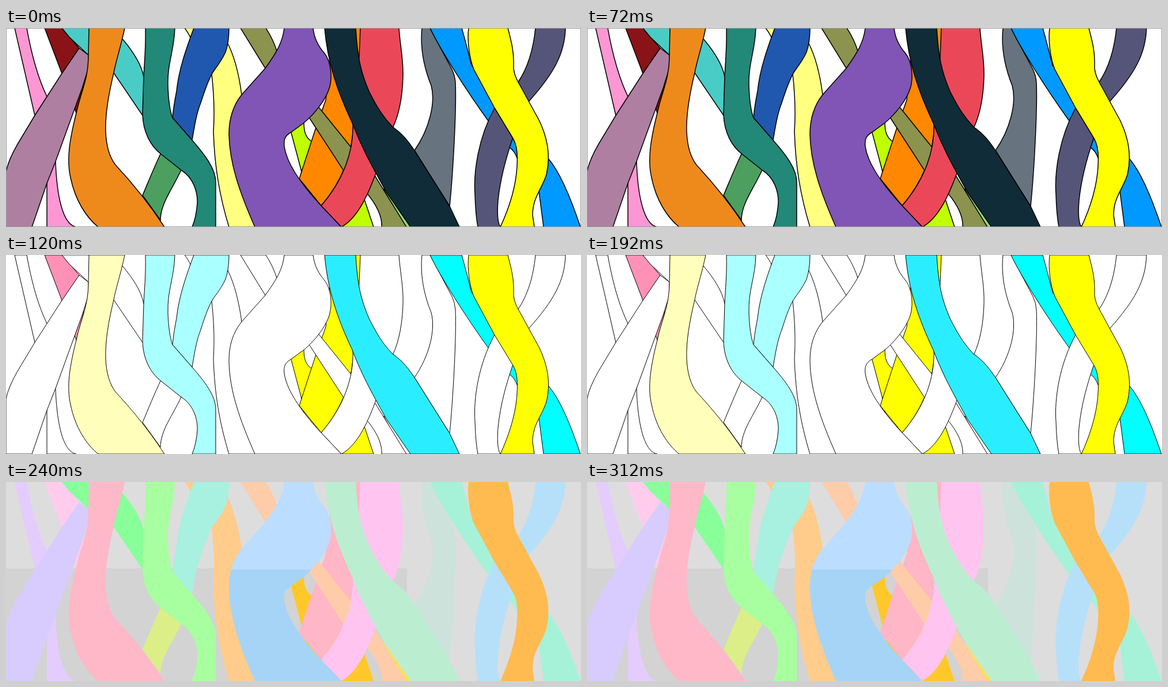
These frames come from a looping animation (998x346 px, 360 ms). An HTML page with a canvas:

```html
<!DOCTYPE html>
<html lang="en">
<head>
<meta charset="utf-8">
<title>Ribbons</title>
<style>
html, body { margin: 0; width: 100%; height: 100%; overflow: hidden; background: #fff; }
canvas { display: block; }
</style>
</head>
<body>
<canvas id="stage" width="998" height="346"></canvas>
<script>
const ctx = document.getElementById('stage').getContext('2d');
const STEP = 120;

// The wide pale ribbon turns bluer below the shaded line.
const paleBlue = ctx.createLinearGradient(0, 0, 0, 346);
paleBlue.addColorStop(0, '#bbddff');
paleBlue.addColorStop(152 / 346, '#bbddff');
paleBlue.addColorStop(152 / 346, '#a6d4f6');
paleBlue.addColorStop(1, '#a6d4f6');

// Back to front: outline, then one fill per colour scheme.
const ribbons = [
  ['M15 0L50 152C62 200 71 230 71 270V346H122C98 342 88 290 86 232L71 119C56 88 45 50 36 0Z',
    '#fc97d4', '#fff', '#e4ccff'],
  ['M67 0L97 79L122 148L135 100L127 35L97 0Z',
    '#8a1318', '#ff91b6', '#ffccee'],
  ['M97 0L110 16L143 47L187 78L237 152H245V90L239 85C235 62 218 38 203 20L143 0Z',
    '#4accc6', '#fff', '#88ff99'],
  ['M127 35L97 79L50 152L20 202Q4 230 0 250V346H45L71 270L86 232L103 185L132 105L143 70V47Z',
    '#ae7fa1', '#fff', '#d8ccff'],
  ['M270 215C258 240 246 270 237 291L268 334C268 305 290 278 304 247Z',
    '#4d9f5f', '#fff', '#dcee88'],
  ['M310 0C316 8 320 15 321 20L357 80C361 115 362 150 360 180C362 240 370 290 387 346H432V200L409 116C405 85 397 50 384 25L330 0Z',
    '#ffff80', '#fff', '#ffcc8c'],
  ['M326 0C315 30 300 70 296 110C292 130 290 145 289 156L323 195C328 165 331 148 338 130C346 105 353 85 361 74C370 62 376 53 381 42Q387 25 387 0Z',
    '#2058b0', '#aaffff', '#a8f0e0'],
  ['M480 140L495 182L512 246L520 290L582 346H638L622 298L560 230L530 197C520 190 517 180 517 165L510 150Z',
    '#bfff00', '#ffff00', '#ffc82a'],
  ['M562 50L555 125L537 176L509 262L547 309C585 265 602 215 603 165L600 150L615 45L616 0H600Z',
    '#ff8800', '#ffff00', '#ffb6c6'],
  ['M655 280L693 346H704L661 284Z',
    '#8fdc7a', '#fff', '#ffe055'],
  ['M407 0L450 70L527 157L586 248L627 288C645 310 653 330 652 346H695L641 258L601 210L543 138L470 40C467 30 460 14 451 0Z',
    '#8b934f', '#fff', '#ffccaa'],
  ['M615 0L613 50L602 165C604 215 585 265 547 309L582 346C612 330 630 285 643 250L672 172C682 150 688 120 689 85C690 55 684 30 682 0Z',
    '#ea4858', '#fff', '#ffc4f0'],
  ['M722 0C718 40 728 75 738 100C746 130 735 175 709 213L770 310C776 250 782 140 780 95Q779 82 774 72L736 0Z',
    '#67737f', '#fff', '#cde2da'],
  ['M736 0C752 35 800 110 836 160L874 208Q882 212 888 228L925 284L933 346H997C985 310 965 255 942 228L880 150L808 65Q798 25 791 0Z',
    '#0099ff', '#00ffff', '#a5f2d8'],
  ['M919 0C915 40 905 70 889 94L848 139C820 190 811 250 814 290Q815 325 819 346H858C854 340 852 325 854 300C858 260 868 225 880 190L908 127C950 80 970 45 971 0Z',
    '#55557a', '#fff', '#b6e0fa'],
  ['M803 0C800 25 805 55 812 72L848 139L880 192C888 205 888 225 887 240C885 280 870 320 858 346H917L914 325C914 295 930 280 938 255C945 225 942 195 925 160L895 105C889 94 880 80 881 65C882 40 876 20 871 0Z',
    '#ffff00', '#ffff00', '#ffbb50'],
  ['M553 0C558 60 575 110 601 165C620 215 640 248 660 285L702 346H787L770 310L709 213C700 200 690 185 671 172C655 155 645 140 630 110C615 75 610 50 607 0Z',
    '#0f2c38', '#2aeeff', '#bbeed0'],
  ['M242 0C243 35 240 60 239 85L237 150C238 180 250 205 270 220L304 247C325 260 333 285 332 305Q330 330 323 346H364V268C364 245 345 220 323 195L289 156C286 148 282 130 281 100C280 60 292 40 293 0Z',
    '#228877', '#aaffff', '#a8ffa0'],
  ['M144 0L143 47C143 90 130 110 122 148C110 195 105 230 112 260C120 300 140 330 160 346H275C245 300 215 265 190 238C180 225 174 205 173 180C172 150 178 115 187 78C190 60 200 30 206 0Z',
    '#ee8a1c', '#ffffbb', '#ffb8c8'],
  ['M483 0C480 25 470 42 450 70L409 116C390 140 387 165 387 185C388 235 405 285 432 346H582L547 309C520 280 488 240 483 206C482 195 483 188 495 181L517 165C535 150 555 125 561 105C566 90 566 60 552 43C545 35 535 20 533 0Z',
    '#8055b5', '#fff', paleBlue]
].map(([outline, ...fills]) => ({ path: new Path2D(outline), fills }));

const schemes = [
  { back: '#fff', line: 1.5, border: true },
  { back: '#fff', line: 1 },
  { back: '#dddddd', line: 0, shade: '#d3d3d3' }
];

function draw(now) {
  const i = Math.floor(now / STEP) % schemes.length;
  const { back, line, border, shade } = schemes[i];
  ctx.fillStyle = back;
  ctx.fillRect(0, 0, 998, 346);
  if (shade) {
    ctx.fillStyle = shade;
    ctx.fillRect(0, 150, 696, 196);
  }
  ctx.strokeStyle = '#000';
  ctx.lineWidth = line || 1;
  for (const { path, fills } of ribbons) {
    ctx.fillStyle = fills[i];
    ctx.fill(path);
    if (line) ctx.stroke(path);
  }
  if (border) {
    ctx.strokeStyle = '#999';
    ctx.lineWidth = 1;
    ctx.strokeRect(0.5, 0.5, 997, 345);
  }
  requestAnimationFrame(loop);
}

const start = performance.now();
const loop = () => draw(performance.now() - start);
loop();
</script>
</body>
</html>
```
